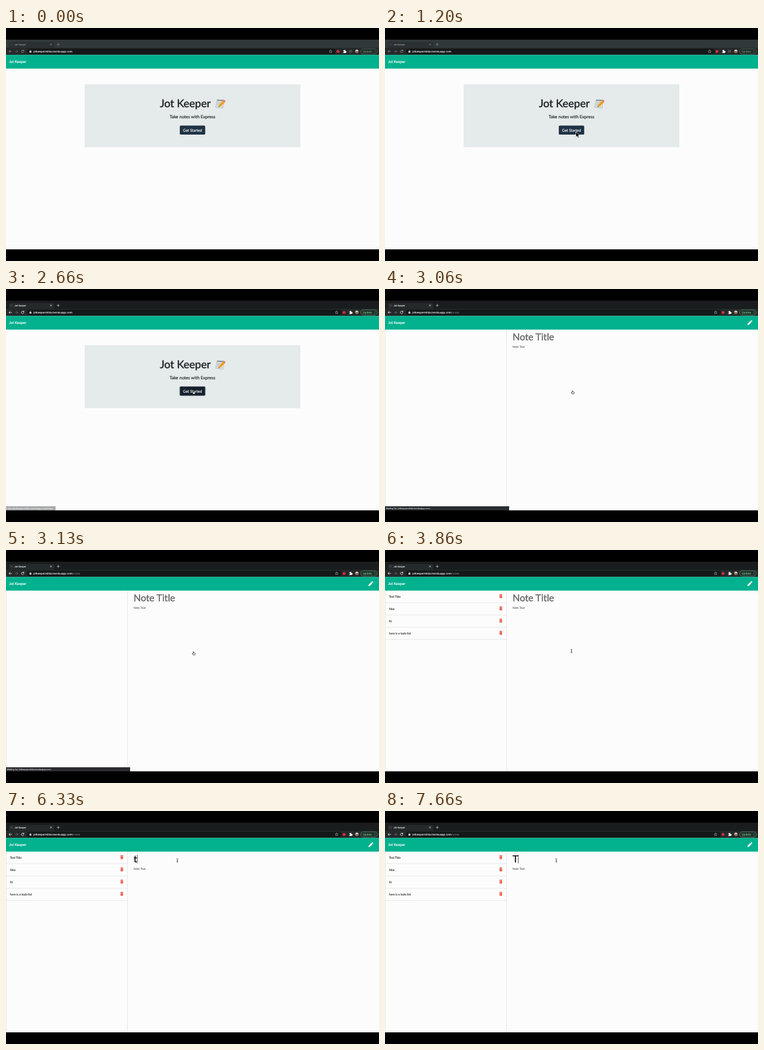
An HTML page that plays this animation: 640 by 400 pixels, repeating every 8000 ms.

```html
<!DOCTYPE html>
<html lang="en">
<head>
<meta charset="utf-8">
<title>Jot Keeper</title>
<style>
  html, body { margin: 0; width: 100%; height: 100%; overflow: hidden; background: #000; }
  svg { display: block; width: 640px; height: 400px; }
  text {
    font-family: Lato, sans-serif; white-space: pre; text-rendering: geometricPrecision;
    fill: currentColor; stroke: currentColor; stroke-width: .025em;
  }
  .ui { font-family: Inter, Roboto, sans-serif; }
  .line { fill: none; stroke-linecap: round; stroke-linejoin: round; }
</style>
</head>
<body>
<svg viewBox="0 0 640 400">
  <defs>
    <g id="bin">
      <path d="M-2.5-3h5v.9h-5zM-.9-3.4h1.8v.5h-1.8zM-2.1-1.7h4.2v4.3q0 .6-.6.6h-3q-.6 0-.6-.6z" fill="#e84a3f"/>
      <path d="M-1-.6v2.6M0-.6v2.6M1-.6v2.6" stroke="#f7b5af" stroke-width=".4"/>
    </g>
  </defs>

  <rect y="20" width="640" height="360" fill="#fcfcfc"/>

  <!-- browser frame -->
  <rect id="strip" y="20" width="640" height="15"/>
  <path id="tab" d="M3 35q2 0 2-2v-7q0-2 2-2h74q2 0 2 2v7q0 2 2 2z"/>
  <rect y="34" width="640" height="12.2" fill="#25292a"/>
  <rect x="36" y="35.5" width="540" height="9.4" rx="4.7" fill="#151819" id="field"/>
  <circle cx="9.5" cy="28.3" r="2.2" fill="#363d3f"/>
  <g id="chrome">
    <text class="ui" x="14.5" y="29.8" font-size="3.9">Jot Keeper</text>
    <path class="line" d="M75.8 26.8l2.8 2.8m0-2.8l-2.8 2.8M87.5 28.2h4.4m-2.2-2.2v4.4" stroke="currentColor" stroke-width=".6"/>
    <path class="line" d="M9.8 40.2h-4.6m2-2l-2 2 2 2M30.5 39a2.2 2.2 0 1 0 .2 2M30.7 37.6v1.7h-1.7" stroke="currentColor" stroke-width=".8"/>
  </g>
  <path class="line" d="M15.8 40.2h4.6m-2-2l2 2-2 2" stroke="#676c6e" stroke-width=".8"/>
  <path d="M40.3 39.6h3.2v2.6h-3.2z" fill="#ddd"/>
  <path class="line" d="M41 39.6v-.7a.9.9 0 0 1 1.8 0v.7" stroke="#ddd" stroke-width=".5"/>
  <text class="ui" x="47" y="41.8" font-size="4.55" color="#f1f3f4">jotkeepermilda.herokuapp.com<tspan id="path" color="#8d9295" fill="currentColor" stroke="none"></tspan></text>
  <g id="tools">
    <path class="line" d="M567.4 37.7l.8 1.7 1.8.2-1.3 1.2.3 1.8-1.6-.9-1.6.9.3-1.8-1.3-1.2 1.8-.2z" stroke="#cdd0d1" stroke-width=".5"/>
    <circle cx="580" cy="40.2" r="2.5" fill="#d32c3d"/>
    <path d="M588.8 38.8h1.3a1 1 0 1 1 1.9 0h1.4v1.3a1 1 0 1 1 0 1.8v1.2h-4.6v-1.4a1 1 0 1 0 0-1.7z" fill="#f0f0f0"/>
  </g>
  <path id="queue" class="line" d="M589 38.6h4.4M589 40.2h2.8M589 41.8h2M593 39.8v2.2" stroke="#85898b" stroke-width=".6"/>
  <circle cx="602" cy="40.2" r="3" fill="#8b6b55"/>
  <path d="M599.1 39.6a3 3 0 0 1 5.8 0z" fill="#e4ded4"/>
  <g id="update">
    <rect x="608.5" y="35.7" width="28.5" height="9" rx="4.5" fill="#20302a" stroke="currentColor" stroke-width=".5"/>
    <text class="ui" x="612.2" y="41.8" font-size="4.6">Update</text>
    <path class="line" d="M633 38.4v0m0 1.8v0m0 1.8v0" stroke="currentColor" stroke-width=".9"/>
  </g>

  <!-- navigation bar -->
  <rect y="46.2" width="640" height="23.5" fill="#02b18e"/>
  <text x="5.2" y="60.2" font-size="6.3" color="#fff">Jot Keeper</text>

  <g id="home">
    <rect x="135" y="96.5" width="370" height="108" fill="#e5eaea"/>
    <text x="264" y="135.8" font-size="18.5" color="#212529">Jot Keeper</text>
    <g transform="translate(359 121)">
      <path d="M3.4 2.2l11.6.5-1.5 13.9-12.9-1.4z" fill="#e3e5e4" stroke="#9da3a4" stroke-width=".6"/>
      <path d="M3.4 2.2l11.6.5-.2 1.9-11.8-.5z" fill="#7f878b"/>
      <path d="M3.6 6.4l9 .5M3.2 8.6l8 .5M2.8 10.8l6 .4M2.5 13l9.4.8" stroke="#9fa7ab" stroke-width=".7"/>
      <path d="M7 10.2l6.6-6.6 3.2 3-6.9 6.7-4.2 1.5z" fill="#f0a72b"/>
      <path d="M8.6 11.9l6.7-6.8" stroke="#d07f1e" stroke-width=".9"/>
      <path d="M13.6 3.6l1-.9q.9-.6 1.9.3t.8 2.2l-.5 1.4z" fill="#dd7868"/>
      <path d="M5.7 14.8l.5-1.8 1.2 1.2z" fill="#333"/>
    </g>
    <text x="320" y="155.3" font-size="7.5" color="#212529" text-anchor="middle">Take notes with Express</text>
    <rect id="button" x="298.2" y="167.6" width="43.6" height="15.4" rx="1.8"/>
    <text x="320" y="177.6" font-size="6.45" color="#fff" text-anchor="middle">Get Started</text>
  </g>

  <g id="notes">
    <path d="M.4 70v310M208.5 70v310" stroke="#e0e2e2" stroke-width=".8"/>
    <path d="M621.7 62l.6-2.6 4.5-4.5 2.1 2.1-4.5 4.5zM627.3 54.4l.7-.7q.5-.3 1 0l1 1q.4.5 0 1l-.6.7z" fill="#fff"/>
    <text id="title" x="219" y="88.3" font-size="16.3"></text>
    <path id="caret" d="M0 75v15" stroke="#333" stroke-width=".8"/>
    <text x="219" y="101.2" font-size="4.85" color="#666">Note Text</text>
    <g id="list"></g>
  </g>

  <g id="status">
    <rect id="bar" y="373" height="7" fill="#2a2d2f"/>
    <text id="hint" class="ui" x="1.5" y="378" font-size="3.75" color="#d5d8d9"></text>
  </g>

  <g id="cursor">
    <path id="arrow" d="M0 0v9.3l2.1-1.9 1.4 3.2 1.7-.7-1.4-3.1h2.9z" fill="#000" stroke="#fff" stroke-width=".7"/>
    <path id="hand" d="M-.7-2.7q.6-.6 1.1 0v1.8l2 .5q.6.2.4.9l-.5 2.2h-2.8l-2-2.3q.3-.7 1.1-.2l.7.5z" fill="#fff" stroke="#111" stroke-width=".7"/>
    <path id="beam" class="line" d="M-1-2.9q.8 0 1 .5q.2-.5 1-.5M0-2.4v4.8M-1 2.9q.8 0 1-.5q.2.5 1 .5M-.6.5h1.2" stroke="#222" stroke-width=".7"/>
  </g>
</svg>
<script>
const LOOP = 8000;
const $ = id => document.getElementById(id);
const show = (id, on) => $(id).style.display = on ? '' : 'none';
const set = (id, attrs) => { for (const k in attrs) $(id).setAttribute(k, attrs[k]); };
const clamp = v => Math.max(0, Math.min(1, v));
const within = (t, a, b) => t >= a && t < b;

$('list').innerHTML = ['Test Title', 'fdsa', 'lit', 'here is a todo list'].map((name, i) => {
  const y = 80 + 21 * i;
  return `<text x="7" y="${y + 1.9}" font-size="5" color="#222">${name}</text>
    <use href="#bin" x="198.7" y="${y - .8}"/>
    <path d="M0 ${y + 10.6}h208.5" stroke="#e0e2e2" stroke-width=".8"/>`;
}).join('');

// time, x, y
const track = [
  [60, 480, 240], [540, 480, 240], [800, 421, 216], [1000, 421, 216], [1200, 327.5, 178],
  [2330, 327.5, 178], [2460, 321.8, 177.5], [3700, 321.8, 177.5], [3860, 320, 173.5],
  [4200, 313, 105], [4340, 313, 105], [4660, 294, 84.8], [LOOP, 294, 84.8]
];

function cursorAt(t) {
  const i = Math.max(1, track.findIndex(p => p[0] > t));
  const [a, b] = [track[i - 1], track[i]];
  const k = clamp((t - a[0]) / (b[0] - a[0]));
  const e = k * k * (3 - 2 * k);
  return [a[1] + (b[1] - a[1]) * e, a[2] + (b[2] - a[2]) * e];
}

function draw(t) {
  const active = t >= 1600, notes = t >= 2930;

  set('strip', { fill: active ? '#1a1d1e' : '#31383a' });
  set('tab', { fill: active ? '#25292a' : '#2b3133' });
  set('field', { width: active ? 540 : 530 });
  const tone = active ? '#eceeef' : '#8f9496';
  set('chrome', { color: tone });
  set('update', { color: active ? '#79bd8e' : '#718078' });
  set('tools', { transform: `translate(${active ? 0 : -10.4} 0)` });
  show('queue', !active);
  $('path').textContent = notes ? '/notes' : '';

  show('home', !notes);
  show('notes', notes);
  show('list', t >= 3400);
  set('button', {
    fill: t >= 2400 ? '#14202c' : '#1f3345',
    stroke: t >= 2530 ? '#566472' : 'none', 'stroke-width': .9
  });

  const typed = t >= 7660 ? 'T' : within(t, 6330, 7260) ? 't' : '';
  $('title').textContent = typed || 'Note Title';
  set('title', { color: typed ? '#111' : '#666' });
  set('caret', { transform: `translate(${typed === 'T' ? 228.6 : typed ? 225.2 : 219.2} 0)` });
  show('caret', within(t, 5130, 5860) || t >= 6330);

  set('bar', { width: notes ? 213 : 85 });
  $('hint').textContent = notes ? 'Waiting for jotkeepermilda.herokuapp.com...'
                                : 'https://jotkeepermilda.herokuapp.com/notes';
  set('status', { opacity: clamp((t - 2540) / 300) * clamp((3600 - t) / 200) });

  const [x, y] = cursorAt(t);
  show('cursor', t >= 60);
  set('cursor', { transform: `translate(${x} ${y})` });
  show('arrow', t < 2400);
  show('hand', within(t, 2400, 3800));
  show('beam', t >= 3800);
}

const start = performance.now();
function tick() {
  draw((performance.now() - start) % LOOP);
  requestAnimationFrame(tick);
}
tick();
</script>
</body>
</html>
```
